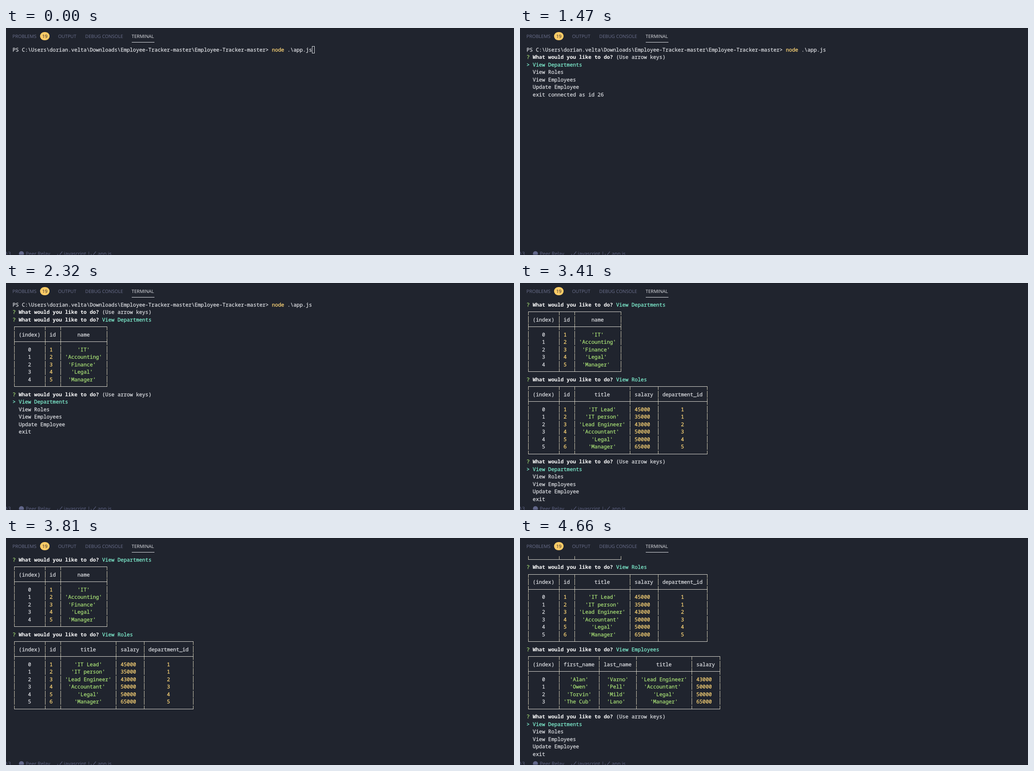
Animation, 1119 px wide and 501 px high, one loop 6620 ms. Source, as an HTML page:

```html
<!DOCTYPE html>
<html lang="en">
<head>
<meta charset="utf-8">
<title>Terminal session</title>
<style>
  html, body { margin: 0; width: 100%; height: 100%; overflow: hidden; background: #20242e; }
  svg { display: block; width: 1119px; height: 501px; overflow: hidden; }
  text { text-rendering: geometricPrecision; }
  .term text {
    font: 11.333px "Noto Sans Mono", "DejaVu Sans Mono", monospace;
    fill: currentColor; stroke: currentColor; stroke-width: .28px;
  }
  .ui text { font: 10.2px "Open Sans", "Noto Sans", sans-serif; fill: #6b708e; }
  .ui .on { fill: #e0e1e6; }
  .ui .badge { fill: #20242e; text-anchor: middle; }
  .ui .status { font-size: 11px; fill: #62678a; }
  .icon { fill: none; stroke: #62678a; stroke-width: 1.1; }
  .fg { color: #dcdee2; }
  .term .ask { color: #fff; font-weight: 700; stroke: none; }
  .num { color: #ffd778; }
  .str { color: #a8e076; }
  .pick { color: #80f2d2; }
  .rule { fill: #d8d6cf; }
  .bar { fill: #d0cab2; }
  .cursor { fill: #dcdee2; }
  .hollow { fill: none; stroke: #dcdee2; }
</style>
</head>
<body>
<svg viewBox="0 0 1119 501">
  <rect width="1119" height="501" fill="#20242e"/>
  <rect width="1119" height="1" fill="#191c25"/>
  <g class="ui">
    <text x="14.3" y="22">PROBLEMS</text>
    <rect x="75" y="9" width="21" height="18" rx="9" fill="#ffcc66"/>
    <text x="85.5" y="22" class="badge">19</text>
    <text x="114.7" y="22">OUTPUT</text>
    <text x="174.5" y="22">DEBUG CONSOLE</text>
    <text x="276.8" y="22" class="on">TERMINAL</text>
    <rect x="277" y="31" width="50" height="1" fill="#e0e1e6"/>
    <circle cx="-2.5" cy="498" r="4.5" class="icon"/>
    <text x="4.5" y="502" class="status">3</text>
    <circle cx="34" cy="498" r="5.5" fill="#62678a"/>
    <text x="43.5" y="502" class="status">Peer Relay</text>
    <path d="M113 499l3.5 3.5L124 493.5M187 499l3.5 3.5L198 493.5" class="icon"/>
    <text x="127.5" y="502" class="status">javascript</text>
    <text x="179.5" y="502" class="status">|</text>
    <text x="202" y="502" class="status">app.js</text>
    <rect y="500" width="1119" height="1" fill="#191c25" opacity=".6"/>
  </g>
  <g class="term" id="term"></g>
</svg>
<script>
const LOOP = 6620, LEFT = 14.5, TOP = 40, CELL = 6.8, ROW = 16.5;

const rowTop = row => Math.floor(TOP + row * ROW);
const rect = (x, y, w, h, cls) =>
  `<rect x="${x}" y="${y}" width="${w}" height="${h}" class="${cls}"/>`;
const put = (row, col, s, cls) =>
  `<text x="${LEFT + col * CELL}" y="${rowTop(row) + 12}" class="${cls}">${s}</text>`;
const barX = col => Math.round(LEFT + (col + 0.5) * CELL);

// A line is a function from its row number to markup.
const line = (...runs) => row => runs.map(r => put(row, ...r)).join("");

const ask = (note, cls = "fg") =>
  line([0, "?", "str"], [2, "What would you like to do?", "ask"], [29, note, cls]);

const bars = (row, cols, from = 0, to = 15) =>
  cols.map(c => rect(barX(c), rowTop(row) + from, 1, to - from, "bar")).join("");

const rule = (cols, from, to) => row => {
  const x = barX(0);
  return bars(row, cols, from, to) +
    rect(x, rowTop(row) + 7, barX(cols.at(-1)) - x + 1, 1, "rule");
};

function table(head, rows) {
  head = ["(index)", ...head];
  rows = rows.map((r, i) => [i, ...r.map(v => typeof v === "string" ? `'${v}'` : v)]);
  const widths = head.map((h, i) =>
    Math.max(...[h, ...rows.map(r => r[i])].map(v => String(v).length)) + 2);
  const cols = [0];
  widths.forEach((w, i) => cols.push(cols[i] + w + 1));
  const kind = (v, i) => i === 0 ? "fg" : typeof v === "number" ? "num" : "str";
  const cells = (vals, cls) => row => bars(row, cols) + vals.map((v, i) =>
    put(row, cols[i] + 1 + Math.floor((widths[i] - String(v).length) / 2), v, cls(v, i))).join("");
  return [
    rule(cols, 7, 15),
    cells(head, () => "fg"),
    rule(cols, 0, 15),
    ...rows.map(r => cells(r, kind)),
    rule(cols, 0, 8)
  ];
}

const choices = ["View Departments", "View Roles", "View Employees", "Update Employee", "exit"];
const menu = (at, tail = "") => [
  ask(at ? "" : "(Use arrow keys)"),
  ...choices.map((c, i) => {
    const text = [2, c + (c === "exit" ? tail : ""), i === at ? "pick" : "fg"];
    return i === at ? line([0, "&gt;", "pick"], text) : line(text);
  })
];

const shell = line(
  [0, "PS C:\\Users\\dorian.velta\\Downloads\\Employee-Tracker-master\\Employee-Tracker-master&gt;", "fg"],
  [84, "node", "num"], [89, ".\\app.js", "fg"]);

const departments = [
  ask(choices[0], "pick"),
  ...table(["id", "name"],
    ["IT", "Accounting", "Finance", "Legal", "Manager"].map((n, i) => [i + 1, n]))
];
const roles = [
  ask(choices[1], "pick"),
  ...table(["id", "title", "salary", "department_id"], [
    [1, "IT Lead", 45000, 1],
    [2, "IT person", 35000, 1],
    [3, "Lead Engineer", 43000, 2],
    [4, "Accountant", 50000, 3],
    [5, "Legal", 50000, 4],
    [6, "Manager", 65000, 5]
  ])
];
const employees = [
  ask(choices[2], "pick"),
  ...table(["first_name", "last_name", "title", "salary"], [
    ["Alan", "Varno", "Lead Engineer", 43000],
    ["Owen", "Pell", "Accountant", 50000],
    ["Torvin", "Mild", "Legal", 50000],
    ["The Cub", "Lano", "Manager", 65000]
  ])
];

const hollow = () => `<rect x="674.5" y="40.5" width="5" height="15" class="hollow"/>`;
const solid = (x, row) => () => rect(x, rowTop(row), 6, 16, "cursor");
const pointer = () =>
  `<path d="M1109 440.5h3M1113 440.5h3M1112.5 441v13M1109 454.5h3M1113 454.5h3" class="hollow"/>`;

const first = [shell, ask("(Use arrow keys)"), ...departments];
const second = [...departments, ...roles];

// [start in ms, lines, extra drawings]
const steps = [
  [0, [shell], hollow],
  [150, [shell], hollow, pointer],
  [230, [shell], hollow],
  [460, [shell], solid(674, 0)],
  [1070, [shell], solid(15, 1)],
  [1390, [shell, ...menu(0)]],
  [1470, [shell, ...menu(0, " connected as id 26")]],
  [2320, [...first, ...menu(0)]],
  [2780, [...first, ...menu(1)]],
  [3410, [...second, ...menu(0)]],
  [3810, second],
  [3880, [...second, ...menu(1)]],
  [4130, [...second, ...menu(2)]],
  [4660, [departments.at(-1), ...roles, ...employees, ...menu(0)]]
];

const term = document.getElementById("term");
term.innerHTML = steps.map(([, lines, ...extras]) =>
  `<g display="none">${lines.map((l, i) => l(i)).join("")}${extras.map(e => e()).join("")}</g>`).join("");
const screens = [...term.children];

let shown = -1;
const start = performance.now();
function draw() {
  const t = (performance.now() - start) % LOOP;
  const now = steps.findLastIndex(s => s[0] <= t);
  if (now !== shown) {
    if (shown >= 0) screens[shown].setAttribute("display", "none");
    screens[now].removeAttribute("display");
    shown = now;
  }
  requestAnimationFrame(draw);
}
draw();
</script>
</body>
</html>
```
